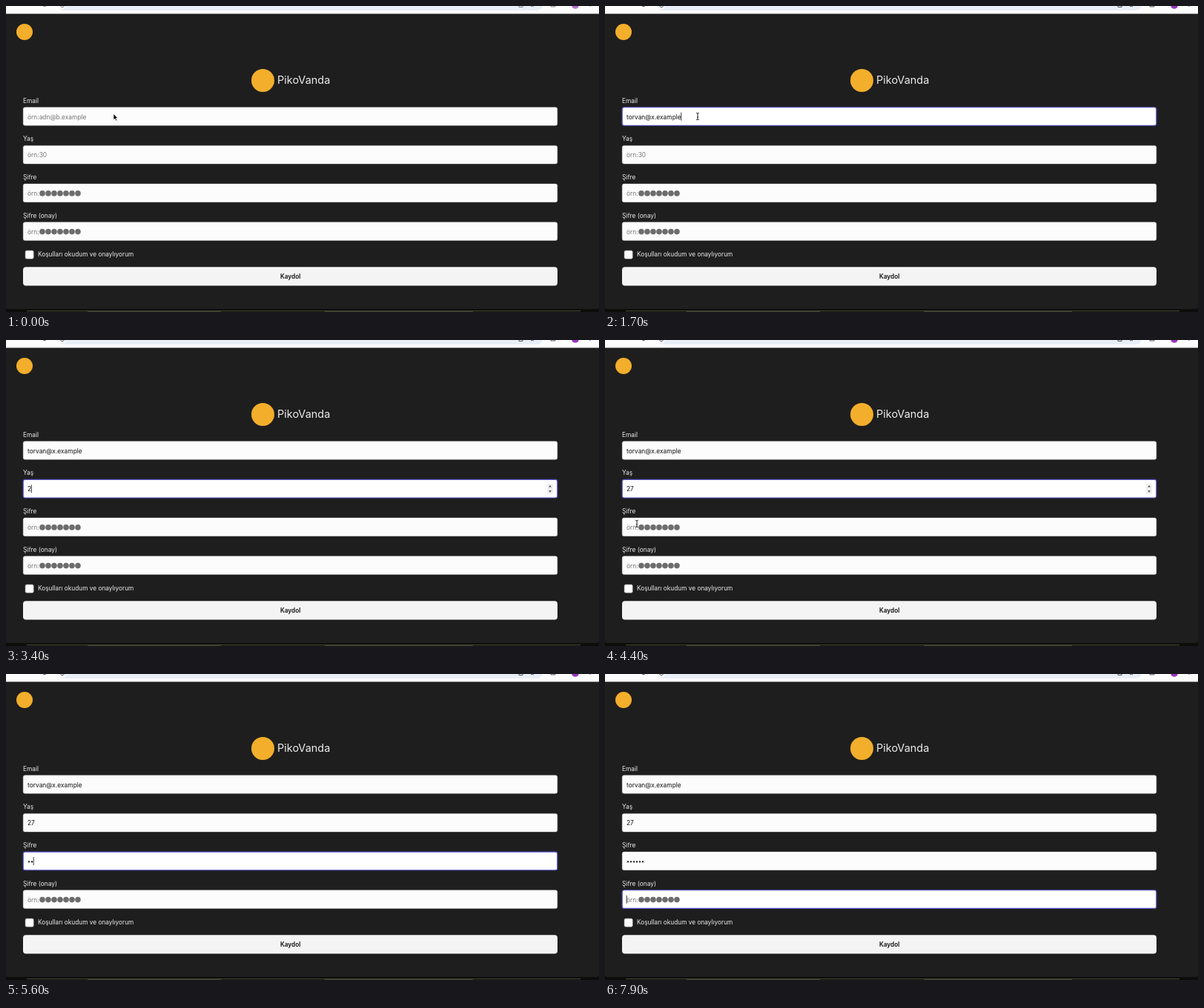
Write an HTML page that moves like this. It is 800 px wide and 413 px high and loops after 8 s.

```html
<!DOCTYPE html>
<html lang="tr">
<head>
<meta charset="utf-8">
<title>Kaydol</title>
<style>
  html, body { margin: 0; width: 100%; height: 100%; overflow: hidden; background: #1e1e1e; }
  svg { display: block; width: 800px; height: 413px; }
  text { font: 8.4px Inter, "Open Sans", sans-serif; fill: #ececec; white-space: pre; }
  .title { font-size: 14.5px; }
  .button { font-weight: 600; font-size: 8.3px; fill: #111; text-anchor: middle; }
  .value { fill: #111; }
  .hint { fill: #757575; }
</style>
</head>
<body>
<svg viewBox="0 0 800 413">
  <rect width="800" height="413" fill="#1e1e1e"/>

  <rect width="800" height="10.5" fill="#fdfdfe"/>
  <rect x="70" y="-14" width="654" height="20" rx="8" fill="#e9eef8"/>
  <g id="chrome">
    <circle cx="76" cy="0" r="4.6" fill="#fff"/>
    <path d="M73.5 0a2.7 2.7 0 0 0 5 0M50 0q2 1.5 4 0M692 0v1.5h5V0M708 1l2-1 2 1M735 0v1h6V0M788 0v1"
      fill="none" stroke="#50545c"/>
    <circle cx="768" cy="-1" r="4.8" fill="#9a35bd"/>
  </g>

  <path d="M0 407.5q1 1.5 4 1.5h792q3 0 4-1.5V413H0z" fill="#0c0d0b"/>
  <path d="M28 411.5h747" stroke="#4a4a38"/>
  <path d="M110 412.5h180M430 412.5h200" stroke="#39402a"/>

  <circle cx="25" cy="35" r="11" fill="#f3ae2b"/>
  <circle cx="346.5" cy="100.5" r="15.5" fill="#f3ae2b"/>
  <text class="title" x="366" y="104.5">PikoVanda</text>

  <g id="form"></g>

  <rect x="26" y="330" width="11.3" height="11.3" rx="2" fill="#fff" stroke="#858585" stroke-width=".6"/>
  <text x="43" y="338" style="font-size:8.3px">Koşulları okudum ve onaylıyorum</text>
  <rect x="23" y="352.3" width="721" height="25.2" rx="4" fill="#f4f4f4"/>
  <text class="button" x="383.7" y="368.2">Kaydol</text>

  <rect id="caret" width=".9" height="11" fill="#222"/>
  <path id="arrow" d="M0 0V8.2L1.9 6.5 3.2 9.4 4.6 8.8 3.3 6H5.9Z" fill="#000" stroke="#fff" stroke-width=".7"/>
  <path id="beam" d="M-1.8-4.6Q0-4.6 0-3.6Q0-4.6 1.8-4.6M0-3.8V3.8M-1.8 4.6Q0 4.6 0 3.6Q0 4.6 1.8 4.6M-1 1H1"
    fill="none" stroke="#222" stroke-width="1"/>
</svg>
<script>
const LOOP = 8000, STEP = 100, BLINK = 500;
const LEFT = 29, TOP = 136.7, PITCH = 51.7, HEIGHT = 24.6;
const $ = id => document.getElementById(id);

// focus: time of the click; keys: time of each typed character
const fields = [
  { label: "Email", hint: "örn:adn@b.example", value: "torvan@x.example", focus: 300,
    keys: Array.from({ length: 16 }, (_, i) => 450 + 70 * i) },
  { label: "Yaş", hint: "örn:30", value: "27", focus: 2500, keys: [3300, 3600], spinner: true },
  { label: "Şifre", hint: "örn:", secret: true, focus: 4700, keys: [5300, 5600, 5800, 6500, 6600, 6700] },
  { label: "Şifre (onay)", hint: "örn:", secret: true, focus: 7500, keys: [] }
];

// Pointer paths [time, x, y]; the pointer is hidden between them
const paths = [
  [[0, 145, 145.5], [100, 143, 147], [300, 126, 149], [500, 125, 149]],
  [[1600, 125, 149], [1800, 125, 149], [2300, 78, 196], [2500, 72, 201], [3300, 72, 201]],
  [[3900, 72, 201], [4100, 66, 213], [4400, 43, 248], [4600, 43, 252], [5300, 43, 252]],
  [[6800, 49, 258], [6900, 57, 267.5], [7200, 59, 298], [7400, 59, 304], [7700, 59, 304]]
];

const dots = (n, x, gap, y, r, color) => Array.from({ length: n }, (_, i) =>
  `<circle cx="${x + gap * i}" cy="${y}" r="${r}" fill="${color}"/>`).join("");

const fieldTop = i => TOP + PITCH * i;

function drawField(f, i, active, count) {
  const y = fieldTop(i), mid = y + 15.9;
  let s = `<text x="23" y="${y - 6}">${f.label}</text>
    <rect x="23.2" y="${y}" width="720.6" height="${HEIGHT}" rx="2.5"
      fill="${active ? "#fff" : "#fcfcfc"}" stroke="${active ? "#5750c8" : "#d8d8d8"}" stroke-width="${active ? 1.1 : .4}"/>`;
  if (!count) {
    s += `<text class="hint" x="${LEFT}" y="${mid}">${f.hint}</text>`;
    if (f.secret) s += dots(7, 49, 8, mid - 3.1, 3.8, "#6c6c6c");
  } else if (f.secret) {
    s += dots(count, 31, 4, mid - 2.6, 1.15, "#111");
  } else {
    s += `<text class="value" id="value${i}" x="${LEFT}" y="${mid}">${f.value.slice(0, count)}</text>`;
  }
  if (f.spinner && active)
    s += `<rect x="730" y="${y + 5.6}" width="8" height="13.4" rx="1" fill="#efefef"/>
      <path d="M732.2 ${y + 10}l1.8-2.5 1.8 2.5zM732.2 ${y + 14.8}l1.8 2.5 1.8-2.5z" fill="#444"/>`;
  return s;
}

function pointerAt(t) {
  const path = paths.find(p => t >= p[0][0] && t < p[p.length - 1][0]);
  if (!path) return null;
  const k = path.findIndex(p => p[0] > t), a = path[k - 1], b = path[k];
  const u = (t - a[0]) / (b[0] - a[0]);
  return [a[1] + (b[1] - a[1]) * u, a[2] + (b[2] - a[2]) * u];
}

function show(el, visible, x = 0, y = 0) {
  el.setAttribute("visibility", visible ? "visible" : "hidden");
  el.setAttribute("transform", `translate(${x} ${y})`);
}

function draw(t) {
  const active = fields.filter(f => t >= f.focus).length - 1;
  const counts = fields.map(f => f.keys.filter(k => k <= t).length);
  $("form").innerHTML = fields.map((f, i) => drawField(f, i, i === active, counts[i])).join("");
  $("chrome").setAttribute("opacity", active < 0 ? .7 : 1);

  if (active < 0) show($("caret"), false);
  else {
    const f = fields[active], n = counts[active];
    const last = n ? f.keys[n - 1] : f.focus;
    const width = !n ? 0 : f.secret ? 4 * n : $("value" + active).getComputedTextLength();
    show($("caret"), Math.floor((t - last) / BLINK) % 2 === 0, LEFT + width - .3, fieldTop(active) + 7);
  }

  const p = pointerAt(t);
  const inField = p && (p[1] - TOP) % PITCH < HEIGHT && t >= 200;
  show($("arrow"), p && !inField, ...(p || []));
  show($("beam"), inField, ...(p || []));
}

let start;
function frame(now) {
  start ??= now;
  draw(Math.floor((now - start) % LOOP / STEP) * STEP);
  requestAnimationFrame(frame);
}
draw(0);
requestAnimationFrame(frame);
</script>
</body>
</html>
```
